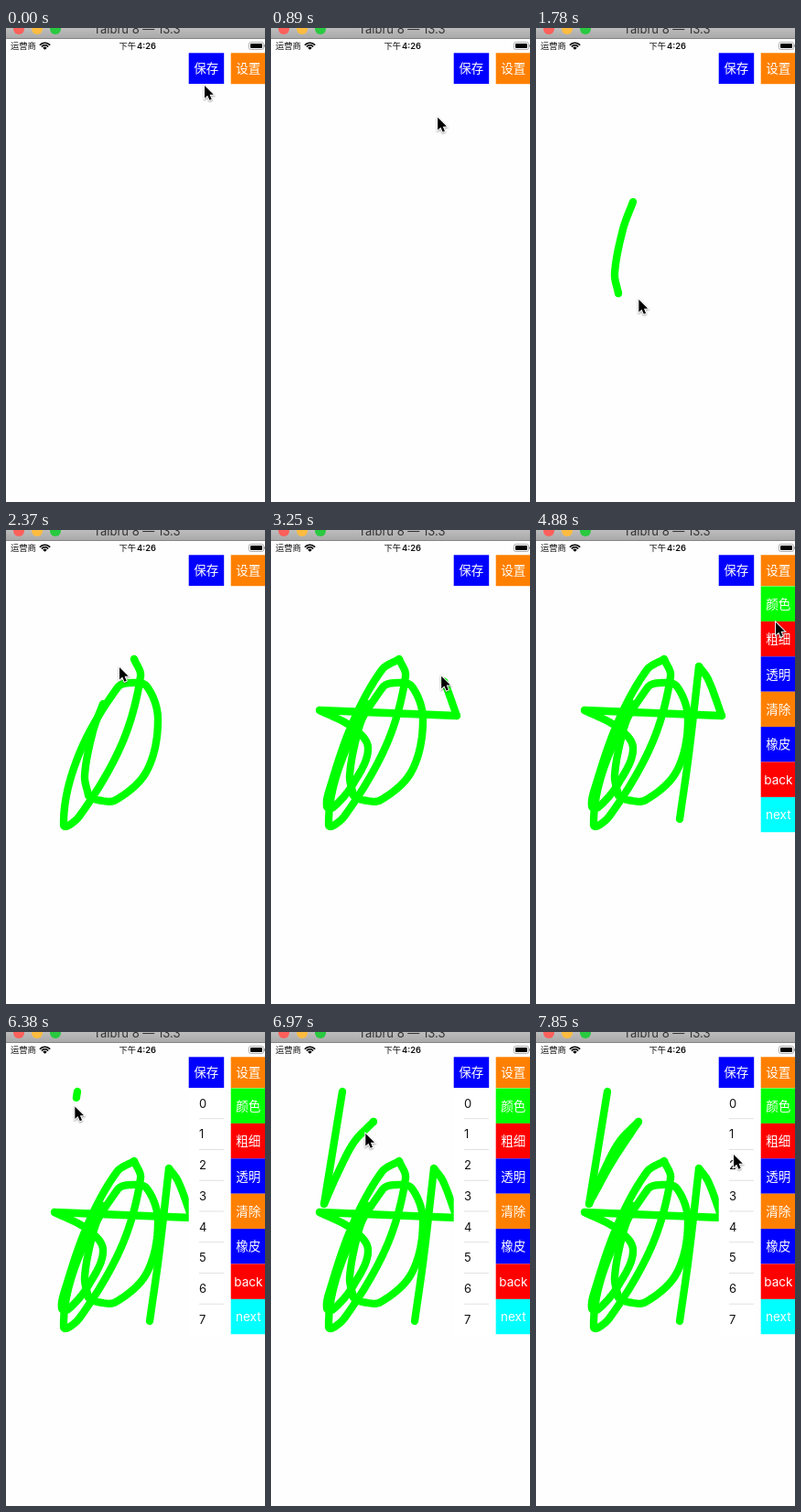
Recreate the animation shown at these times as an HTML page with a canvas. Size 283 px wide and 518 px high, loop 7990 ms.

```html
<!DOCTYPE html>
<html lang="zh">
<head>
<meta charset="utf-8">
<style>
  html, body { margin: 0; width: 100%; height: 100%; overflow: hidden; background: #fff; }
  canvas { display: block; width: 283px; height: 518px; }
</style>
</head>
<body>
<canvas id="stage"></canvas>
<script>
const W = 283, H = 518, LOOP = 7990;
const STEPS = 54, STEP = LOOP / STEPS;
const POINTER_LEAD = 24; // ms the pointer runs ahead of the ink
const FONT = 'Inter, "Noto Sans CJK SC", "Noto Sans CJK", sans-serif';
const GREEN = '#00ff00', BLUE = '#0000ff', RED = '#ff0000', ORANGE = '#ff8000', CYAN = '#00ffff';
const MENU = [
  ['颜色', GREEN], ['粗细', RED], ['透明', BLUE], ['清除', ORANGE],
  ['橡皮', BLUE], ['back', RED], ['next', CYAN]
];
const MENU_TOP = 61.5, MENU_ROW = 38.4;
const LIST_TOP = 61, LIST_ROW = 33.75, LIST_COUNT = 8;

const canvas = document.getElementById('stage');
const ctx = canvas.getContext('2d');
const dpr = window.devicePixelRatio || 1;
canvas.width = W * dpr;
canvas.height = H * dpr;

const clamp = v => Math.max(0, Math.min(1, v));
const easeInOut = v => (1 - Math.cos(Math.PI * v)) / 2;
const parse = str => str.split(' ').map(pair => pair.split(',').map(Number));

// The hand's path as legs; each starts where the one before ended.
const legs = [];
let hand = [217, 63];

function addLeg(first, last, path, ink) {
  const keys = [hand, ...parse(path)];
  hand = keys[keys.length - 1];
  legs.push({ from: first * STEP, to: last * STEP, points: smooth(keys), ink });
}
const move = (first, last, path) => addLeg(first, last, path, false);
const draw = (first, last, path) => addLeg(first, last, path, true);

// Times count in steps.
move(0.2, 3, '226,52');
move(4, 9, '115,168');
move(10.2, 10.6, '106,190');
draw(10.6, 12, '95,220 86,268 90,290');
draw(12, 16, '100,295 120,295 154,263 166,207 154,171 137,167 122,172 79,247 63,322 80,313 126,235 147,160 140,141');
draw(16, 19, '121,153 89,211 65,280 61,302 68,303 90,277 106,238 88,215 53,197');
draw(19, 21, '203,203');
draw(21, 22.5, '188,163 178,149');
draw(22.5, 24, '167,245 157,316');
move(24, 26, '263,32');
move(26.2, 27, '270,24');
move(29.2, 30, '268,42');
move(31.2, 33, '262,101');
move(33.4, 38, '111,148');
move(38.2, 39, '66,130');
move(40.2, 41, '78,65');
draw(42.88, 45, '58,188');
draw(45, 47, '74,152 91,120 112,98');
draw(47, 48, '83,142 62,180');
move(48, 50, '232,89');
move(50.2, 53, '216,134');

// Hermite curve whose tangents are as long as the chord, so it never loops.
function smooth(keys, parts = 12) {
  const at = i => keys[Math.max(0, Math.min(keys.length - 1, i))];
  const tangent = (i, size) => {
    const [ax, ay] = at(i - 1), [bx, by] = at(i + 1);
    const k = size / (Math.hypot(bx - ax, by - ay) || 1);
    return [(bx - ax) * k, (by - ay) * k];
  };
  const points = [keys[0]];
  for (let i = 0; i < keys.length - 1; i++) {
    const p = keys[i], q = keys[i + 1];
    const size = Math.hypot(q[0] - p[0], q[1] - p[1]);
    const m = tangent(i, size), n = tangent(i + 1, size);
    for (let j = 1; j <= parts; j++) {
      const u = j / parts, v = 1 - u;
      points.push([0, 1].map(a =>
        p[a] * v * v * (1 + 2 * u) + q[a] * u * u * (1 + 2 * v)
        + m[a] * u * v * v - n[a] * u * u * v));
    }
  }
  return points;
}

// The first part of a polyline, cut at a fraction of its length.
function cut(points, fraction) {
  const lengths = points.slice(1).map(([x, y], i) => Math.hypot(x - points[i][0], y - points[i][1]));
  let left = fraction * lengths.reduce((a, b) => a + b, 0);
  const part = [points[0]];
  for (let i = 0; i < lengths.length && left > 0; i++) {
    const u = Math.min(1, left / lengths[i]);
    part.push([0, 1].map(a => points[i][a] + (points[i + 1][a] - points[i][a]) * u));
    left -= lengths[i];
  }
  return part;
}

function travelled({ from, to, points, ink }, t) {
  const u = clamp((t - from) / (to - from));
  return cut(points, ink ? u : easeInOut(u));
}

function rect(x, y, w, h, color) {
  ctx.fillStyle = color;
  ctx.fillRect(x, y, w, h);
}

function trace(points) {
  ctx.beginPath();
  points.forEach(([x, y]) => ctx.lineTo(x, y));
}

function text(str, x, y, size, { color = '#111', align = 'center', weight = 400 } = {}) {
  ctx.font = `${weight} ${size}px ${FONT}`;
  ctx.textAlign = align;
  ctx.fillStyle = color;
  ctx.fillText(str, x, y);
}

function button(label, x, y, h, color) {
  rect(x, y, 38.5, h, color);
  text(label, x + 19.1, y + h / 2 + 5, 13.5, { color: '#fff' });
}

function drawTitleBar() {
  const shade = ctx.createLinearGradient(0, 0, 0, 11);
  shade.addColorStop(0, '#bdbdbd');
  shade.addColorStop(1, '#a9a9a9');
  rect(0, 0, W, 11, shade);
  rect(0, 11, W, 1, '#858585');
  ['#fc605b', '#fdbc40', '#29c940'].forEach((color, i) => {
    ctx.beginPath();
    ctx.arc(14 + i * 20, 1, 6, 0, Math.PI * 2);
    ctx.fillStyle = color;
    ctx.fill();
  });
  text('Talbru 8 — 13.3', 143, 6, 13, { color: '#333' });
}

function drawStatusBar() {
  text('运营商', 5, 23, 9.3, { align: 'left' });
  text('下午', 123.5, 23, 9.3, { align: 'left', weight: 500 });
  text('4:26', 164, 23, 9.3, { align: 'right', weight: 600 });

  const wave = r => ctx.arc(42.5, 23.8, r, -Math.PI * 0.77, -Math.PI * 0.23);
  ctx.strokeStyle = ctx.fillStyle = '#000';
  ctx.lineWidth = 1.6;
  ctx.lineCap = 'butt';
  for (const r of [4.9, 7.5]) {
    ctx.beginPath();
    wave(r);
    ctx.stroke();
  }
  ctx.beginPath();
  ctx.moveTo(42.5, 23.8);
  wave(3);
  ctx.fill();

  ctx.lineWidth = 0.8;
  ctx.strokeStyle = '#999';
  ctx.beginPath();
  ctx.roundRect(265.5, 15.5, 16, 8, 2);
  ctx.stroke();
  ctx.beginPath();
  ctx.roundRect(267, 17, 13, 5, 1);
  ctx.fill();
  rect(282.2, 18, 0.8, 3, '#999');
}

function drawInk(t) {
  ctx.strokeStyle = GREEN;
  ctx.lineWidth = 8.3;
  ctx.lineCap = ctx.lineJoin = 'round';
  for (const leg of legs) {
    if (!leg.ink || t <= leg.from) continue;
    trace(travelled(leg, t));
    ctx.stroke();
  }
}

function drawMenu(t) {
  const open = clamp((t / STEP - 28) / 2);
  ctx.save();
  ctx.beginPath();
  ctx.rect(245, 61, 38, open * (MENU_ROW * MENU.length + 1));
  ctx.clip();
  MENU.forEach(([label, color], i) =>
    button(label, 245.7, MENU_TOP + i * MENU_ROW, MENU_ROW, color));
  ctx.restore();
}

function drawList(t) {
  if (t < 35 * STEP) return;
  rect(199.7, LIST_TOP, 38.5, LIST_ROW * LIST_COUNT, '#fff');
  for (let i = 0; i < LIST_COUNT; i++) {
    const y = LIST_TOP + i * LIST_ROW;
    text(String(i), 211, y + 21.6, 13, { align: 'left' });
    if (i) rect(211, y - 0.5, 27, 0.9, '#dedede');
  }
}

function drawPointer(t) {
  const leg = legs.filter(({ from }) => from <= t).pop() || legs[0];
  const [x, y] = travelled(leg, t).pop();
  ctx.save();
  ctx.translate(x, y);
  ctx.scale(0.94, 0.94);
  trace(parse('0,0 0,14.5 3.4,11.4 5.8,16.8 8.2,15.8 5.9,10.5 10.4,10.4'));
  ctx.closePath();
  ctx.lineJoin = 'miter';
  ctx.lineWidth = 2;
  ctx.strokeStyle = '#fff';
  ctx.shadowColor = 'rgba(0,0,0,.4)';
  ctx.shadowBlur = 2 * dpr;
  ctx.shadowOffsetY = dpr;
  ctx.stroke();
  ctx.shadowColor = 'transparent';
  ctx.fillStyle = '#000';
  ctx.fill();
  ctx.restore();
}

function render(t) {
  ctx.setTransform(dpr, 0, 0, dpr, 0, 0);
  rect(0, 0, W, H, '#fefefe');
  drawTitleBar();
  drawStatusBar();
  drawInk(t);
  button('保存', 199.7, 27.3, 33.7, BLUE);
  button('设置', 245.7, 27.3, 33.9, ORANGE);
  drawMenu(t);
  drawList(t);
  drawPointer(t + POINTER_LEAD);
}

// The picture advances in hard steps; the small offset absorbs rounded step times.
const start = performance.now();
function tick() {
  const time = (performance.now() - start) % LOOP;
  const step = Math.min(STEPS - 1, Math.floor((time + 6) / STEP));
  render(step * STEP + 0.01);
  requestAnimationFrame(tick);
}
tick();
</script>
</body>
</html>
```
